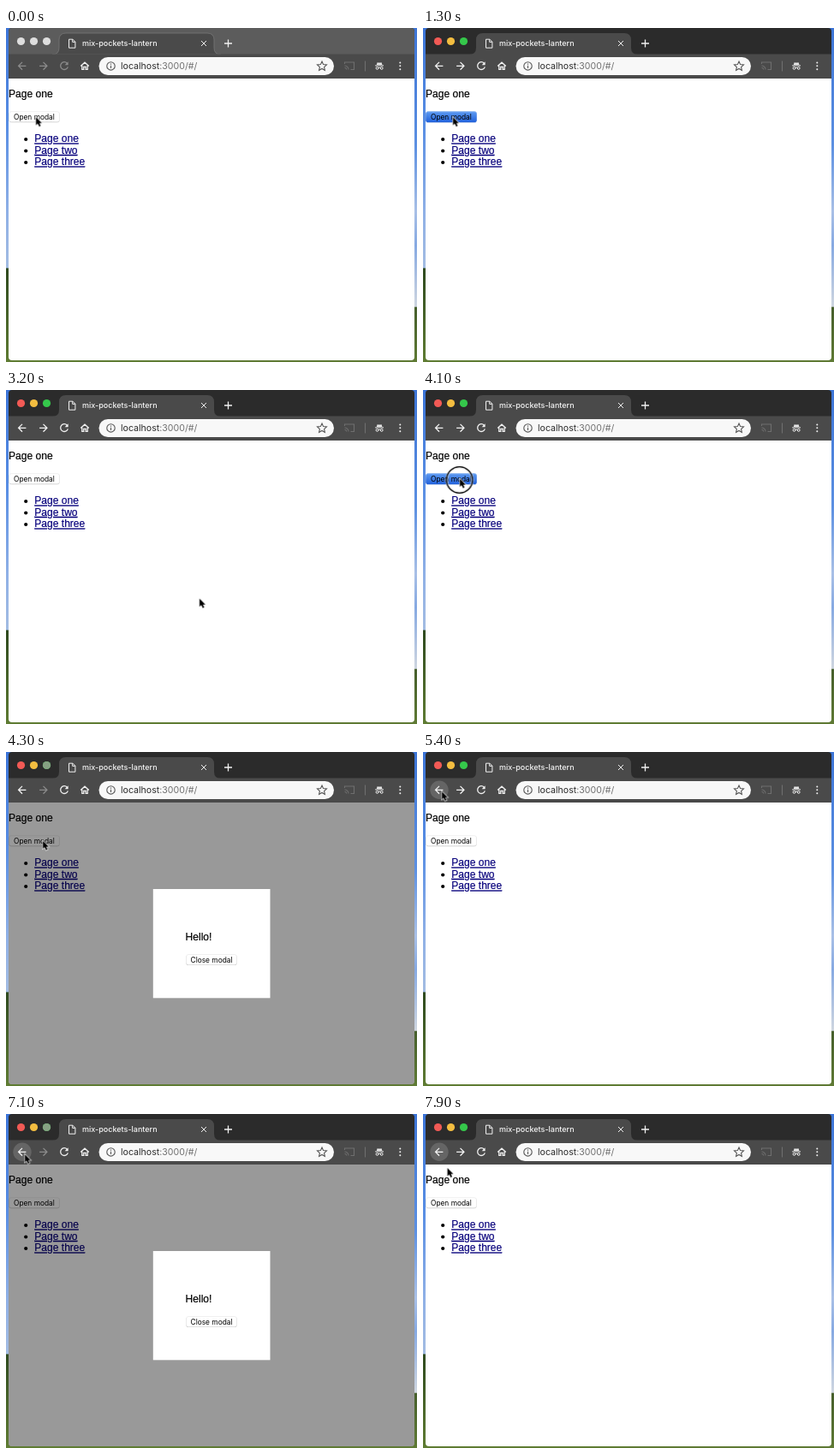
Write an HTML page that moves like this. It is 480x390 px and loops after 8000 ms.

```html
<!DOCTYPE html>
<html lang="en">
<head>
<meta charset="utf-8">
<title>Modal demo</title>
<style>
  html, body { margin: 0; width: 100%; height: 100%; overflow: hidden; }
  svg { display: block; width: 480px; height: 390px; }
  text { font-family: "Liberation Sans", Arial, sans-serif; font-size: 12.05px; white-space: pre; }
  .page { stroke: currentColor; stroke-width: .2; }
  .link { fill: #08007c; color: #08007c; text-decoration: underline; }
  .ui { font-family: Inter, sans-serif; }
  .title { font-size: 9px; font-weight: 500; }
  .address { font-size: 10.6px; }
  .label { font-size: 8.35px; }
  .icon { color: #f1f1f1; fill: none; stroke: currentColor; stroke-width: 1.3; }
  .thin { stroke-width: 1; }

  .anim { animation: 8s step-end infinite; }
  .idle { animation-name: idle; }
  .modal { animation-name: modal; }
  .nav { animation-name: nav; }
  .next { animation-name: next; }
  .press-open { animation-name: press-open; }
  .press-close { animation-name: press-close; }
  .hover-back { animation-name: hover-back; }
  .hover-next { animation-name: hover-next; }
  .ring { animation-name: ring; }
  .cursor { animation: cursor 8s ease-in-out infinite; }

  @keyframes idle { 0% { opacity: 1 } 8.75%, 100% { opacity: 0 } }
  @keyframes modal {
    0%, 37.5%, 66.25%, 92.5%, 100% { opacity: 0 }
    17.5%, 52.5%, 80% { opacity: 1 }
  }
  @keyframes nav { 0% { color: #8b8b8b } 8.75%, 100% { color: #f1f1f1 } }
  /* forward is unavailable while the modal is open */
  @keyframes next {
    0%, 17.5%, 52.5%, 80% { color: #8b8b8b }
    8.75%, 37.5%, 66.25%, 92.5%, 100% { color: #f1f1f1 }
  }
  @keyframes press-open {
    0%, 17.5%, 52.5%, 100% { opacity: 0 }
    15%, 51.25% { opacity: 1 }
  }
  @keyframes press-close { 0%, 37.5%, 100% { opacity: 0 } 36.25% { opacity: 1 } }
  @keyframes hover-back {
    0%, 70%, 100% { opacity: 0 }
    61.25%, 86.25%, 99.9% { opacity: 1 }
  }
  @keyframes hover-next { 0%, 82.5%, 100% { opacity: 0 } 72.5% { opacity: 1 } }
  @keyframes ring {
    0%, 10%, 18.75%, 38.75%, 53.5%, 67.5%, 80%, 93.75%, 100% { opacity: 0 }
    8.75%, 17.5%, 36.25%, 51.25%, 65%, 77.5%, 91.25% { opacity: 1 }
  }
  @keyframes cursor {
    0%, 20% { transform: translate(35px, 104px) }
    31.25% { transform: translate(200px, 234px) }
    35%, 41.25% { transform: translate(226px, 243.5px) }
    50%, 54.5% { transform: translate(43px, 103.5px) }
    62.5%, 68.75% { transform: translate(22px, 46px) }
    73.75%, 81.25% { transform: translate(46.5px, 48px) }
    87.5%, 94% { transform: translate(22px, 47px) }
    98.75%, 100% { transform: translate(28.5px, 63px) }
  }
</style>
</head>
<body>
<svg viewBox="0 0 480 390">
  <defs>
    <linearGradient id="sky" x2="0" y2="1">
      <stop offset="0" stop-color="#3b74d8"/>
      <stop offset=".3" stop-color="#5a8fe4"/>
      <stop offset=".55" stop-color="#8fb0e6"/>
      <stop offset=".718" stop-color="#a3bce2"/>
      <stop offset=".72" stop-color="#2f4a1f"/>
      <stop offset="1" stop-color="#5f7c33"/>
    </linearGradient>
    <linearGradient id="clouds" x2="0" y2="1">
      <stop offset="0" stop-color="#3c74d6"/>
      <stop offset=".35" stop-color="#5c90e2"/>
      <stop offset=".55" stop-color="#a9c0e6"/>
      <stop offset=".65" stop-color="#86a9e2"/>
      <stop offset=".834" stop-color="#cfd6e0"/>
      <stop offset=".836" stop-color="#465f2c"/>
      <stop offset="1" stop-color="#5f7a34"/>
    </linearGradient>
    <linearGradient id="blue" x2="0" y2="1">
      <stop offset="0" stop-color="#5d9af2"/>
      <stop offset="1" stop-color="#2161db"/>
    </linearGradient>
    <clipPath id="window"><rect x="3" y="0" width="474" height="388" rx="4"/></clipPath>
    <path id="tab" d="M54 31q8 0 8-8v-9q0-8 8-8h165q8 0 8 8v9q0 8 8 8z"/>
    <g id="button">
      <rect x=".5" y="1" width="59" height="12" rx="2.6" fill="#c4c4c4"/>
      <rect x=".6" y=".5" width="58.8" height="11.9" rx="2.4" fill="#fff" stroke="#e6e6e6" stroke-width=".6"/>
    </g>
    <rect id="pressed" x=".2" y=".3" width="59.6" height="12.8" rx="2.8" fill="url(#blue)"/>
    <path id="arrow" d="M4.4 0H-4.2M0-4.4L-4.4 0L0 4.4"/>
  </defs>

  <rect width="240" height="390" fill="url(#sky)"/>
  <rect x="240" width="240" height="390" fill="url(#clouds)"/>

  <g clip-path="url(#window)">
    <!-- tab strip -->
    <rect width="480" height="31" fill="#2b2b2b"/>
    <use href="#tab" fill="#4a4a4a"/>
    <circle cx="17.5" cy="15.5" r="4.6" fill="#f25a55"/>
    <circle cx="32.5" cy="15.5" r="4.6" fill="#f3bd40"/>
    <circle cx="47.5" cy="15.5" r="4.6" fill="#35c84b"/>
    <circle class="anim modal" cx="47.5" cy="15.5" r="4.6" fill="#86a183"/>
    <g class="anim idle">
      <rect width="480" height="31" fill="#5c5c5c"/>
      <use href="#tab" fill="#4a4a4a" stroke="#7b7b7b" stroke-width=".7"/>
      <g fill="#dedede">
        <circle cx="17.5" cy="15.5" r="4.6"/>
        <circle cx="32.5" cy="15.5" r="4.6"/>
        <circle cx="47.5" cy="15.5" r="4.6"/>
      </g>
    </g>
    <path class="icon thin" d="M73.5 13.2h4.4l3 3v7h-7.4zM77.7 13.4v3h3"/>
    <text class="ui title" x="89" y="21.3" fill="#f4f4f4">mix-pockets-lantern</text>
    <path class="icon thin" d="M228 15l6 6m0-6l-6 6"/>
    <path class="icon" d="M255 18h9m-4.5-4.5v9"/>

    <!-- toolbar -->
    <rect y="30.5" width="480" height="29" fill="#4a4a4a"/>
    <circle class="anim hover-back" cx="19" cy="44.3" r="10.7" fill="#656565"/>
    <circle class="anim hover-next" cx="43.5" cy="44.3" r="10.7" fill="#656565"/>
    <g class="icon">
      <use class="anim nav" href="#arrow" x="19" y="44.3" stroke="currentColor"/>
      <use class="anim next" href="#arrow" transform="translate(43.5 44.3) scale(-1 1)" stroke="currentColor"/>
      <g class="anim nav" stroke="currentColor">
        <path d="M71.4 41.2A4.4 4.4 0 1 0 72.3 45.4"/>
        <path d="M72.6 39.2v4h-4z" fill="currentColor" stroke="none"/>
      </g>
      <path d="M87.2 44.6L92 40.2l4.8 4.4M88.8 43.8v4.6h2v-3h2.4v3h2v-4.6"/>
    </g>
    <rect x="108.5" y="34" width="274.5" height="21" rx="10.5" fill="#f8f8f8"/>
    <g fill="none" stroke="#555" stroke-width="1.1">
      <circle cx="122.5" cy="44.4" r="4.7"/>
      <path d="M122.5 43.8v3.3m0-5.5v1.1"/>
      <path d="M369 39l1.6 3.6 3.9.4-2.9 2.6.8 3.9-3.4-2-3.4 2 .8-3.9-2.9-2.6 3.9-.4z"/>
    </g>
    <text class="ui address" x="134" y="48.2" fill="#2a2a2a">localhost<tspan fill="#707070">:3000/#/</tspan></text>
    <g fill="none" stroke="#6f6f6f" stroke-width="1.1">
      <path d="M395.5 42v-2h11v8.5h-4M395.5 44q4.3.3 4.5 4.5M395.5 46.3q2.1.1 2.2 2.2"/>
      <path d="M419.5 38.5v12"/>
    </g>
    <path d="M433.6 40.2l1.4.4h2.2l1.4-.4.8 2.7h-6.6z" fill="#e4e4e4"/>
    <g class="icon thin">
      <path d="M431.2 43.9h9.8M434.8 46.5q1.3-.6 2.6 0"/>
      <circle cx="433.5" cy="46.9" r="1.4"/>
      <circle cx="438.7" cy="46.9" r="1.4"/>
    </g>
    <g fill="#f1f1f1">
      <circle cx="460.3" cy="40.4" r="1"/>
      <circle cx="460.3" cy="44.3" r="1"/>
      <circle cx="460.3" cy="48.2" r="1"/>
    </g>

    <!-- page -->
    <rect y="59" width="480" height="331" fill="#fff"/>
    <text class="page" x="3" y="81.3">Page one</text>
    <use href="#button" x="3" y="97.2"/>
    <use class="anim press-open" href="#pressed" x="3" y="97.2"/>
    <text class="ui label" x="9" y="107">Open modal</text>
    <circle cx="23.2" cy="130" r="2.1"/>
    <circle cx="23.2" cy="143.5" r="2.1"/>
    <circle cx="23.2" cy="157" r="2.1"/>
    <text class="page link" x="33.3" y="133.4">Page one</text>
    <text class="page link" x="33.3" y="146.9">Page two</text>
    <text class="page link" x="33.3" y="160.4">Page three</text>

    <g class="anim modal">
      <rect y="59" width="480" height="331" opacity=".4"/>
      <rect x="171.8" y="160" width="136.7" height="127.3" fill="#fff"/>
      <text class="page" x="209.6" y="220.2">Hello!</text>
      <use href="#button" x="210" y="236"/>
      <use class="anim press-close" href="#pressed" x="210" y="236"/>
      <text class="ui label" x="215.6" y="245.9">Close modal</text>
    </g>
  </g>

  <g class="cursor">
    <g class="anim ring" transform="translate(-.4 1.5)" fill="none">
      <circle r="16.2" stroke="#ddd" stroke-width=".8"/>
      <circle r="15.2" stroke="#111" stroke-width="1.5"/>
      <circle r="13.9" stroke="#ddd" stroke-width=".8"/>
    </g>
    <path transform="scale(.9)" d="M0 0v10.6l2.4-2.2 1.8 4 2-.9-1.8-3.8h3.3z" stroke="#fff" stroke-width="1.3" paint-order="stroke"/>
  </g>
</svg>
</body>
</html>
```
